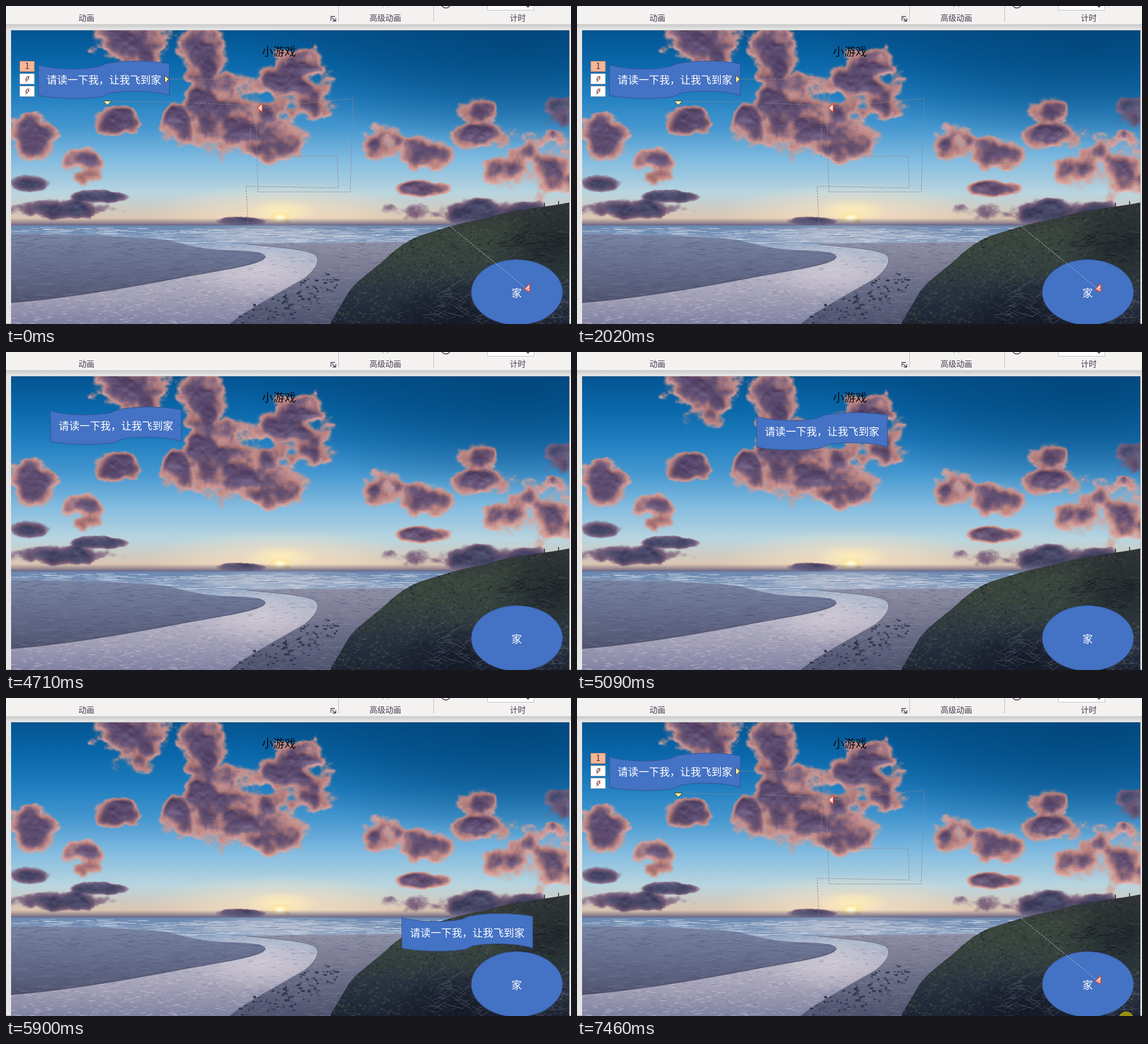
Animation, 998 px wide and 561 px high, one loop 7560 ms. Source, as an HTML page with a canvas:

```html
<!DOCTYPE html>
<html lang="zh-CN">
<meta charset="utf-8">
<style>
html, body { margin: 0; width: 100%; height: 100%; overflow: hidden; background: #e6e6e6 }
canvas { display: block; width: 998px; height: 561px }
</style>
<canvas id="stage" width="998" height="561"></canvas>
<script>
const W = 998, H = 561, LOOP = 7560, HORIZON = 388;
const FONT = '"Noto Sans CJK SC", "Noto Sans CJK", sans-serif';
const ctx = document.getElementById('stage').getContext('2d');

let seed = 7;
const rnd = () => (seed = seed * 16807 % 2147483647) / 2147483647;
const between = (a, b) => a + (b - a) * rnd();
const mix = (a, b, k) => a + (b - a) * k;
const ramp = (v, a, b) => Math.min(1, Math.max(0, (v - a) / (b - a)));
const smooth = k => k * k * (3 - 2 * k);

function hash(x, y) {
  const h = Math.sin(x * 127.1 + y * 311.7) * 43758.5453;
  return h - Math.floor(h);
}

function noise(x, y) {
  const i = Math.floor(x), j = Math.floor(y), u = smooth(x - i), v = smooth(y - j);
  return mix(mix(hash(i, j), hash(i + 1, j), u), mix(hash(i, j + 1), hash(i + 1, j + 1), u), v);
}

function fractal(x, y) {
  let sum = 0;
  for (let o = 0, a = 0.5; o < 5; o++, a /= 2) sum += a * noise(x * 2 ** o + o * 17, y * 2 ** o);
  return sum;
}

function layer(paint) {
  const c = document.createElement('canvas');
  c.width = W; c.height = H;
  paint(c.getContext('2d'));
  return c;
}

function gradient(g, y0, y1, ...colors) {
  const fill = g.createLinearGradient(0, y0, 0, y1);
  colors.forEach((c, i) => fill.addColorStop(i / (colors.length - 1), c));
  return fill;
}

function shape(g, d, fill, stroke, width = 1) {
  const p = new Path2D(d);
  if (fill) { g.fillStyle = fill; g.fill(p); }
  if (stroke) { g.strokeStyle = stroke; g.lineWidth = width; g.stroke(p); }
}

function label(g, text, x, y, size, color) {
  g.font = `${size}px ${FONT}`;
  g.textAlign = 'center';
  g.fillStyle = color;
  g.fillText(text, x, y + size * 0.37);
}

// Soft ellipse in colour "r,g,b"
function glow(g, rgb, x, y, rx, ry, alpha = 1) {
  const f = g.createRadialGradient(0, 0, 0, 0, 0, 1);
  f.addColorStop(0, `rgba(${rgb},${alpha})`);
  f.addColorStop(0.5, `rgba(${rgb},${alpha * 0.6})`);
  f.addColorStop(1, `rgba(${rgb},0)`);
  g.save();
  g.translate(x, y);
  g.scale(rx, ry);
  g.fillStyle = f;
  g.fillRect(-1, -1, 2, 2);
  g.restore();
}

// Noise-edged clouds around ellipses [x, y, rx, ry], lit at the rim and darker inside
function clouds(g, masses, rim, core) {
  const image = g.getImageData(0, 0, W, HORIZON), px = image.data;
  for (let y = 43; y < HORIZON; y++)
    for (let x = 9; x < 995; x++) {
      let depth = -1;
      for (const [cx, cy, rx, ry] of masses)
        depth = Math.max(depth, 1 - ((x - cx) / rx) ** 2 - ((y - cy) / ry) ** 2);
      if (depth <= -0.9) continue;
      const puff = fractal(x / 42, y / 32);
      const body = depth + 2.6 * (puff - 0.48);
      const alpha = 0.95 * smooth(ramp(body, 0, 0.5));
      if (!alpha) continue;
      const shade = smooth(ramp(body, 0.25, 1.05));
      const light = 150 * (puff - fractal(x / 42, (y + 5) / 32));
      for (let c = 0, p = (y * W + x) * 4; c < 3; c++, p++)
        px[p] = mix(px[p], mix(rim[c], core[c], shade) + light, alpha);
    }
  g.putImageData(image, 0, 0);
}

// Random short strokes clipped to an area
function grain(g, d, [x0, y0, x1, y1], colors, count, len, rise, width = 1) {
  g.save();
  g.clip(new Path2D(d));
  g.lineWidth = width;
  for (let i = 0; i < count; i++) {
    const x = between(x0, x1), y = between(y0, y1);
    g.strokeStyle = colors[i % colors.length];
    g.beginPath();
    g.moveTo(x, y);
    g.lineTo(x + between(0.3, 1) * len, y + between(-rise, rise));
    g.stroke();
  }
  g.restore();
}

function paintSky(g) {
  g.fillStyle = gradient(g, 43, HORIZON, '#045491', '#0a68aa', '#217fc0', '#4798d0', '#83bce0', '#b9d5df', '#e6c0a2');
  g.fillRect(0, 0, W, HORIZON);
  glow(g, '0,66,118', 900, 60, 480, 190, 0.75);
  glow(g, '250,228,196', 485, 372, 240, 62, 0.75);

  clouds(g, [
    [215, 75, 68, 50], [345, 90, 46, 52], [395, 175, 88, 66], [445, 235, 105, 46],
    [510, 140, 68, 62], [302, 212, 30, 44], [45, 235, 48, 42], [137, 280, 38, 28],
    [195, 198, 44, 26], [663, 240, 40, 36], [742, 260, 50, 36], [830, 178, 38, 34],
    [845, 230, 65, 32], [935, 285, 88, 62], [735, 322, 48, 15]
  ], [226, 152, 136], [92, 70, 104]);
  clouds(g, [
    [35, 312, 42, 17], [168, 337, 50, 11], [975, 186, 40, 26],
    [75, 358, 120, 17], [860, 362, 170, 22], [430, 379, 60, 9]
  ], [124, 94, 122], [62, 62, 96]);

  glow(g, '255,238,185', 486, 361, 66, 20, 0.9);
  glow(g, '255,228,130', 484, 375, 24, 13);
  glow(g, '255,255,235', 484, 374, 13, 8);
  g.fillStyle = gradient(g, 374, HORIZON, '#6a658600', '#5d5c80');
  g.fillRect(0, 374, W, 14);
}

function paintLand(g) {
  const water = 'M0 387H998V561H0Z';
  const dune = 'M0 403C90 402 220 405 285 413C330 424 350 430 400 431C440 432 458 436 458 442C455 452 420 460 340 473C250 490 120 515 0 524Z';
  const beach = 'M425 420C500 417 600 418 705 416L690 440L570 561H395C430 532 500 497 530 478C550 462 556 446 545 438C525 428 480 426 425 420Z';
  const hill = 'M998 346C950 356 890 359 850 374C800 383 770 393 735 404C700 416 685 434 660 455C635 475 615 490 605 505L572 561H998Z';

  g.fillStyle = gradient(g, 387, 561, '#6885ae', '#a3b3cc', '#b3b1c3', '#9f9db4', '#8082a3');
  g.fillRect(0, 387, W, 174);
  glow(g, '230,222,224', 480, 402, 200, 18, 0.6);
  glow(g, '222,212,218', 450, 465, 120, 55, 0.6);
  grain(g, water, [0, 391, 800, 420], ['#dce3eca0', '#5d7aa580', '#c6d2e2a0'], 420, 38, 0.6);
  grain(g, water, [0, 424, 560, 561], ['#e2dae075', '#6c6f9260', '#cac4d465'], 1500, 11, 1.5);

  shape(g, dune, gradient(g, 403, 524, '#7984a3', '#6b7493', '#5e6482', '#51546f'));
  grain(g, dune, [0, 403, 460, 524], ['#8c97b248', '#3a3e6048', '#525b7848'], 900, 22, 3);
  shape(g, 'M458 442C455 452 420 460 340 473C250 490 120 515 0 524', null, '#474962a0', 2);
  shape(g, beach, gradient(g, 417, 561, '#8d8fa6', '#7a7a92', '#626681', '#4e526d'));
  shape(g, 'M425 420C480 426 525 428 545 438C556 446 550 462 530 478', null, '#4d4d63a0');
  grain(g, beach, [395, 418, 700, 561], ['#b5b0b948', '#363f6058', '#6f738d50'], 700, 14, 3);
  for (let i = 0; i < 110; i++) {
    const u = rnd(), x = 398 + 135 * u + between(0, 100 - 40 * u), y = 556 - 82 * u + between(-4, 18);
    g.fillStyle = i % 3 ? '#303850' : '#4a5068';
    g.beginPath();
    g.ellipse(x, y, between(1, 4), between(0.8, 2.4), 0, 0, 7);
    g.fill();
  }

  shape(g, hill, gradient(g, 348, 561, '#2f3236', '#3a463c', '#35413e', '#293240', '#1d2434'));
  grain(g, hill, [570, 348, 998, 561], ['#56624875', '#1a243090', '#46533f75', '#28323f90', '#564e6265'], 2600, 6, 4, 2);
  g.save();
  g.clip(new Path2D(hill));
  glow(g, '16,21,34', 790, 550, 130, 75, 0.7);
  glow(g, '16,21,34', 970, 420, 120, 70, 0.6);
  g.restore();
  grain(g, hill, [735, 490, 998, 561], ['#7c819770', '#11162690', '#555e7680'], 210, 34, 18);
  grain(g, hill, [865, 395, 998, 455], ['#17191f', '#51515a80'], 45, 35, 15);
  shape(g, 'M951 347V358M976 344V355', null, '#29262e', 1.5);
}

const photo = layer(g => { paintSky(g); paintLand(g); });

const frame = layer(g => {
  g.fillStyle = '#e6e6e6';
  g.fillRect(0, 0, W, H);
  g.fillStyle = gradient(g, 32, 41, '#cbcbcb', '#d5d5d5', '#e6e6e6');
  g.fillRect(0, 32, W, 9);
  g.fillStyle = '#f3f2f1';
  g.fillRect(0, 0, W, 32);
  const ink = '#49394f';
  label(g, '动画', 142, 21, 14, ink);
  label(g, '高级动画', 670, 21, 14, ink);
  label(g, '计时', 904, 21, 14, ink);
  shape(g, 'M587.5 0V27M755.5 0V27', null, '#bdbbbb');
  shape(g, 'M574 26V18.5H581M576 21L582 26.5M582.5 21.5V26.5H577', null, ink, 1.3);
  shape(g, 'M768.5 -5a8.5 8.5 0 0 0 17 0', null, ink, 1.3);
  shape(g, 'M850.5 -2H932.5V7.5H850.5Z', '#fff', '#c3c0c0');
  shape(g, 'M919 -1L922 2L925 -1', null, '#333', 1.5);
  shape(g, 'M665 2L668 -1M675 2L672 -1M939 0h3', null, '#bbb', 1.5);
  shape(g, 'M9.5 561V42.5H995.5V561', null, '#c2c2c2');
  shape(g, 'M0 560.5H998', null, '#b2b2b2');
});

const slide = layer(g => {
  g.drawImage(frame, 0, 0);
  g.drawImage(photo, 9, 43, 986, 518, 9, 43, 986, 518);
  label(g, '小游戏', 482, 81, 20, '#0b0b10');
  shape(g, 'M822 505a80.5 57.5 0 1 0 161 0a80.5 57.5 0 1 0 -161 0Z', '#4472c4', '#36599c');
  label(g, '家', 902, 506, 18, '#fff');
});

const route = [[173, 130], [433, 129], [431, 265], [585, 265], [587, 321], [424, 318], [428, 392], [785, 389], [921, 500]];

// Point at fraction u of a polyline's length
function along(points, u) {
  const parts = points.slice(1).map(([x, y], i) => Math.hypot(x - points[i][0], y - points[i][1]));
  let rest = u * parts.reduce((a, b) => a + b);
  let i = 0;
  while (i < parts.length - 1 && rest > parts[i]) rest -= parts[i++];
  const k = rest / parts[i], [a, b] = [points[i], points[i + 1]];
  return [mix(a[0], b[0], k), mix(a[1], b[1], k)];
}

// Smooth start and end, slightly quicker in the second half
function flight(t) {
  const phase = 0.528 * ramp(t, 4570, 5510) + 0.472 * ramp(t, 5510, 6200);
  return (1 - Math.cos(Math.PI * phase)) / 2;
}

function banner([x, y]) {
  ctx.save();
  ctx.translate(x, y);
  shape(ctx, 'M-115.5 -26C-85 -17 -35 -17 -9 -23L3 -28C35 -35 85 -34 115.5 -28V28C85 18 35 19 9 24L-3 30C-35 35 -85 34 -115.5 28Z', '#4472c4', '#31538f');
  label(ctx, '请读一下我，让我飞到家', 0, 0.5, 18.4, '#fff');
  ctx.restore();
}

function editMarks() {
  const start = '#fbf3a0', end = '#f3d9d3', red = '#dc4a34';
  ctx.setLineDash([3, 2]);
  shape(ctx, 'M289 129H433L431 265H585L587 321L424 318L428 392L785 389', null, '#8b8790');
  shape(ctx, 'M187 168L305 170L400 174L448 180L613 163L608 328H445L441 180', null, '#8b8790');
  shape(ctx, 'M785 389L921 500', null, '#c3c3c6');
  ctx.setLineDash([]);
  shape(ctx, 'M280.5 122.5L287.5 129L280.5 136Z', start, '#45452f');
  shape(ctx, 'M172 167.5H186L179 175Z', start, '#45452f');
  shape(ctx, 'M452.5 172L444 180L452.5 187Z', end, red, 1.3);
  shape(ctx, 'M925 490L915.5 500L925 504Z', end, red, 1.3);
  shape(ctx, 'M916 502L927 497M922 506L924 502', null, red);
  shape(ctx, 'M24.5 97.5H50V115.5H24.5Z', '#f6b699', '#c9826a');
  label(ctx, '1', 37.5, 106, 14, '#4a2b25');
  for (const y of [119.5, 141.5]) {
    shape(ctx, `M24.5 ${y}H50V${y + 18}H24.5Z`, '#fff', '#c8b9b4');
    shape(ctx, `M37 ${y + 5}h4l-2 3h2l-6 6l1.5 -4h-2Z`, '#f3cfc4', '#6d2b22');
  }
}

// Pointer highlight visits: start, end, path
const visits = [
  [220, 460, [[958, 561], [106, 186]]],
  [1000, 1250, [[-10, 298], [219, 202], [-10, 240]]],
  [1460, 2020, [[63, 200], [200, 128], [294, 180], [220, 258], [63, 200]]],
  [7460, LOOP, [[970, 566], [970, 567]]]
];

function pointer(t) {
  const visit = visits.find(([a, b]) => t >= a && t < b);
  if (!visit) return;
  const [a, b, path] = visit;
  const [x, y] = along(path, ramp(t, a, b));
  ctx.fillStyle = 'rgba(190,180,0,.75)';
  ctx.beginPath();
  ctx.arc(x, y, 13, 0, 7);
  ctx.fill();
}

function draw(t) {
  const blank = t >= 4280 && t < 4350 || t >= 7330 && t < 7460;
  const editing = t < 4280 || t >= 7460;
  ctx.drawImage(blank ? frame : slide, 0, 0);
  if (blank) return;
  ctx.save();
  ctx.beginPath();
  ctx.rect(9, 43, 986, 518);
  ctx.clip();
  banner(editing ? route[0] : along(route, flight(t)));
  if (editing) editMarks();
  pointer(t);
  ctx.restore();
}

const begin = performance.now();
(function tick() {
  draw((performance.now() - begin) % LOOP);
  requestAnimationFrame(tick);
})();
</script>
</html>
```
